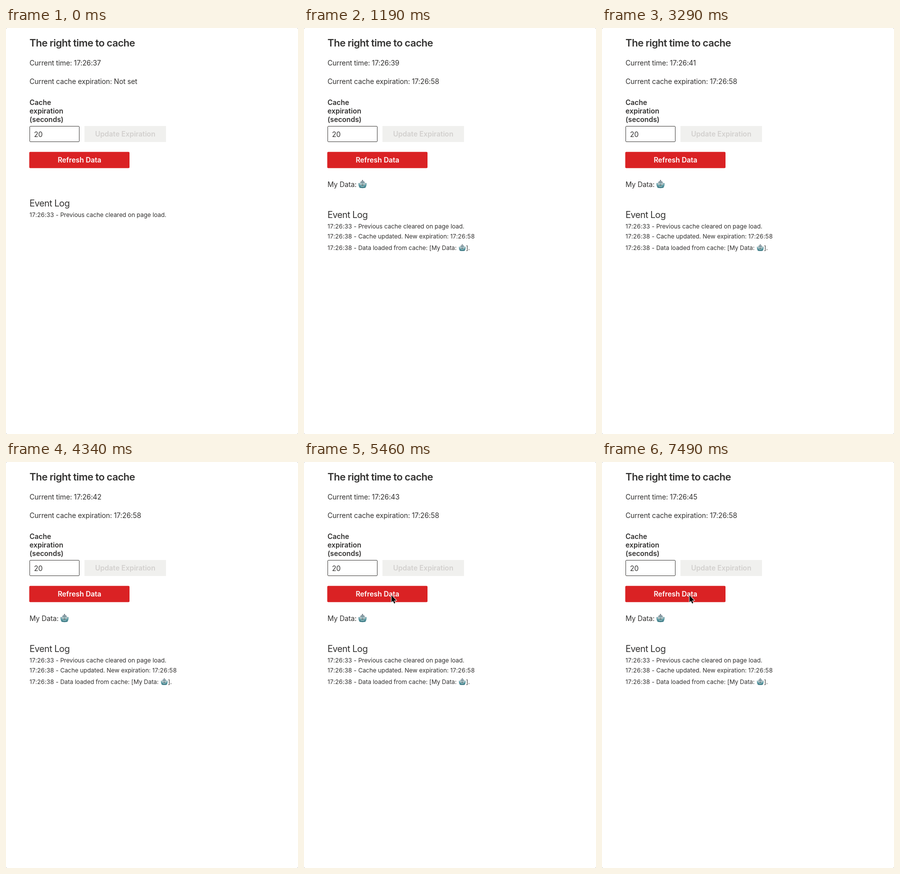
An HTML page that plays this animation: 584 by 812 pixels, repeating every 8000 ms.

```html
<!DOCTYPE html>
<html lang="en">
<head>
<meta charset="utf-8">
<title>The right time to cache</title>
<style>
  html, body { margin: 0; width: 100%; height: 100%; overflow: hidden; background: #999; }
  svg { display: block; }
  text {
    font: 14px Inter, "Open Sans", sans-serif;
    font-optical-sizing: none;
    letter-spacing: -.11px;
    fill: #323130;
    white-space: pre;
  }
  .bold { font-weight: 600; letter-spacing: 0; }
  .title { font-size: 20px; font-weight: 600; letter-spacing: -.52px; }
  .head { font-size: 18px; letter-spacing: -.5px; }
  .log { font-size: 12px; letter-spacing: -.03px; }
  .log tspan { letter-spacing: .18px; }
  .mid { text-anchor: middle; }
</style>
</head>
<body>
<svg width="584" height="812" viewBox="0 0 584 812">
  <defs>
    <linearGradient id="metal" x2="0" y2="1">
      <stop offset="0" stop-color="#8fb4ba"/>
      <stop offset=".45" stop-color="#5d9aa4"/>
      <stop offset="1" stop-color="#2f6f7a"/>
    </linearGradient>
    <g id="robot">
      <circle cx="9" cy="1.6" r="1.3" fill="#78828a"/>
      <path d="M4 7Q4.5 2.6 9 2.6T14 7Z" fill="#8498a1"/>
      <path d="M.8 6.6H17.2Q17.6 12 14.8 16Q9 17.6 3.2 16Q.4 12 .8 6.6Z" fill="url(#metal)"/>
      <circle cx="5.7" cy="8.6" r="2" fill="#e4efef"/>
      <circle cx="12.3" cy="8.6" r="2" fill="#e4efef"/>
      <circle cx="5.7" cy="8.6" r=".9" fill="#3c4a50"/>
      <circle cx="12.3" cy="8.6" r=".9" fill="#3c4a50"/>
      <path d="M9 9.2L10.1 11.3H7.9Z" fill="#b2523f"/>
      <path d="M5.5 13.5H12.5" stroke="#a9cacb" stroke-width="1.2"/>
    </g>
  </defs>

  <rect width="584" height="812" rx="2" fill="#fff"/>
  <text class="title" x="47" y="37">The right time to cache</text>
  <text id="clock" x="47" y="75"></text>
  <text id="expiry" x="47" y="112"></text>

  <text class="bold" x="47" y="154">Cache</text>
  <text class="bold" x="47" y="171">expiration</text>
  <text class="bold" x="47" y="188">(seconds)</text>
  <rect x="47.5" y="196.5" width="99" height="31" rx="1.5" fill="#fff" stroke="#494846"/>
  <text x="56" y="218">20</text>
  <rect x="157" y="196" width="163" height="32" fill="#f0f0ee"/>
  <text class="bold mid" x="238.5" y="217" style="fill:#d2d0ce">Update Expiration</text>
  <rect x="46.5" y="247.75" width="200.5" height="32.5" rx="2" fill="#da2224"/>
  <text class="bold mid" x="147" y="269" style="fill:#fff">Refresh Data</text>

  <g id="log">
    <text class="head" x="47" y="357">Event Log</text>
    <text class="log" x="47" y="378"><tspan>17:26:33</tspan> - Previous cache cleared on page load.</text>
  </g>
  <g id="data">
    <text x="47" y="318">My Data:</text>
    <use href="#robot" x="108" y="303.5"/>
    <text class="log" x="47" y="421"><tspan>17:26:38</tspan> - Cache updated. New expiration: <tspan>17:26:58</tspan></text>
    <text class="log" x="47" y="444"><tspan>17:26:38</tspan> - Data loaded from cache: [My Data:</text>
    <use href="#robot" transform="translate(309 432) scale(.84)"/>
    <text class="log" x="324" y="444">].</text>
  </g>
  <path id="cursor" d="M174.9 266.6V280.6L178 277.8L180.3 283L182.5 282L180.3 276.9H184.7Z"
    fill="#000" stroke="#fff" stroke-width="1.8" stroke-linejoin="round" paint-order="stroke"/>
</svg>
<script>
  const LOOP = 8000, LOADED = 140, POINTER = 5110;
  const ticks = [210, 1190, 2240, 3290, 4340, 5460, 6440, 7490];
  const $ = id => document.getElementById(id);
  const show = (id, on) => $(id).setAttribute("visibility", on ? "visible" : "hidden");
  const start = performance.now();

  function draw() {
    const t = (performance.now() - start) % LOOP;
    const loaded = t >= LOADED;
    const seconds = 37 + ticks.filter(tick => t >= tick).length;
    $("clock").textContent = `Current time: 17:26:${seconds}`;
    $("expiry").textContent = `Current cache expiration: ${loaded ? "17:26:58" : "Not set"}`;
    $("log").setAttribute("transform", `translate(0 ${loaded ? 23 : 0})`);
    show("data", loaded);
    show("cursor", t >= POINTER);
    requestAnimationFrame(draw);
  }
  draw();
</script>
</body>
</html>
```
